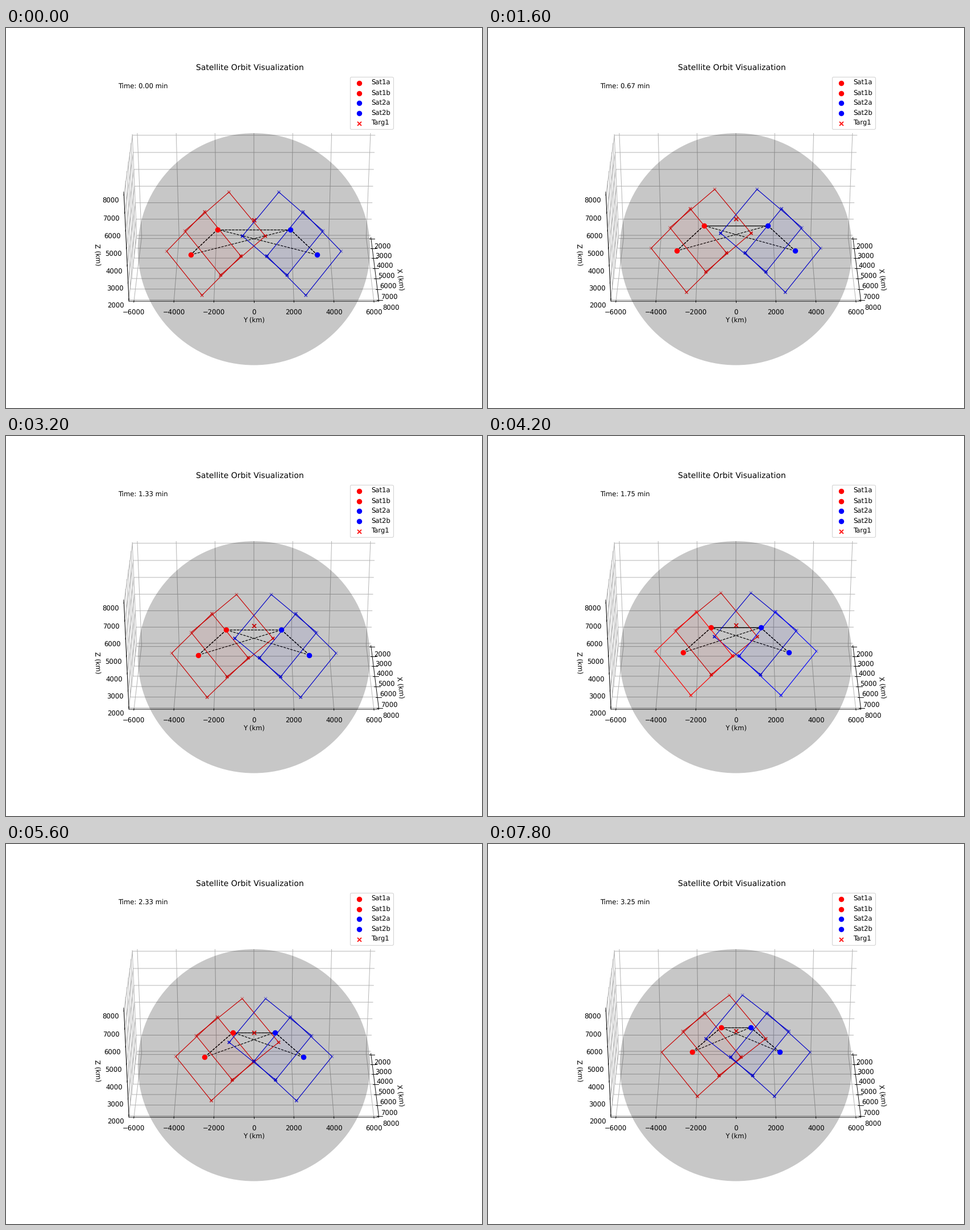
A matplotlib script that plays this animation: 837 px wide and 669 px high, repeating every 8000 ms.

```python
import numpy as np
import matplotlib.pyplot as plt
from matplotlib.animation import FuncAnimation
from matplotlib.patches import Circle, Polygon

W, H, DPI = 837, 669, 83.625
FRAMES, STEP_MS, STEP_S = 40, 200, 5
RED, BLUE = (1, 0, 0), (0, 0, 1)

EARTH, ORBIT, MU = 6371.0, 7371.0, 398600.0       # km, km^3/s^2
RATE = np.sqrt(MU / ORBIT ** 3)                   # rad/s
SPREAD = np.radians(19.84)                        # footprint corner from nadir

# Camera of the 3D box: elevation 30, azimuth 0
ELEV = np.radians(30)
RIGHT = np.array([0, 1, 0])
UP = np.array([-np.sin(ELEV), 0, np.cos(ELEV)])
VIEW = np.array([np.cos(ELEV), 0, np.sin(ELEV)])
BOX_MID = np.array([5000, 0, 5000])
UNIT = 1.829464 * 25 / 24 / np.sqrt(6) / 6250     # box units per km
SIDE = 0.77 * H
FOCAL = SIDE / 0.185
SHIFT = (0.95 / 1.85 - 0.5) * SIDE
CENTER = np.array([0.5125 * W + SHIFT, 0.505 * H - SHIFT])


def project(pts):
    """Points in km (n, 3) to stage pixels (n, 2), y downwards."""
    rel = (np.atleast_2d(pts) - BOX_MID) * UNIT
    scale = FOCAL / (10 - rel @ VIEW)
    return CENTER + np.column_stack([rel @ RIGHT, -(rel @ UP)]) * scale[:, None]


def orbit_frame(u, raan, inc):
    """Unit vectors outwards, along the track and across it."""
    node = np.array([np.cos(raan), np.sin(raan), 0])
    rise = np.array([-np.sin(raan) * np.cos(inc),
                     np.cos(raan) * np.cos(inc), np.sin(inc)])
    out = np.cos(u) * node + np.sin(u) * rise
    track = np.cos(u) * rise - np.sin(u) * node
    return out, track, np.cross(out, track)


class Satellite:
    def __init__(self, label, color, start, raan, inc):
        self.start, self.raan, self.inc = np.radians([start, raan, inc])
        self.color = color
        self.edge = Polygon(np.zeros((4, 2)), fc="none", ec=color, lw=1)
        stage.add_patch(self.edge)
        self.marks = stage.scatter(np.zeros(4), np.zeros(4), s=20, marker="x",
                                   color=[color])
        self.dot = stage.scatter([0], [0], s=50, color=[color], label=label,
                                 zorder=6)

    def move(self, seconds):
        out, track, side = orbit_frame(self.start + RATE * seconds,
                                       self.raan, self.inc)
        self.pos = project(ORBIT * out)[0]
        self.dot.set_offsets([self.pos])

        turn = np.radians(45 + 90 * np.arange(4))[:, None]
        corners = EARTH * (np.cos(SPREAD) * out + np.sin(SPREAD)
                           * (np.cos(turn) * track + np.sin(turn) * side))
        self.quad = project(corners)
        self.edge.set_xy(self.quad)
        self.marks.set_offsets(self.quad)

        # Far corners fade; a quad facing the viewer lies over the globe
        near = corners @ VIEW
        alpha = 0.3 + 0.7 * (near - near.min()) / np.ptp(near)
        self.marks.set_color([(*self.color, a) for a in alpha])
        front = near.max() > EARTH * np.cos(np.radians(2.7))
        self.edge.set_zorder(4 if front else 2.1)
        self.marks.set_zorder(4.1 if front else 2.2)


plt.rcParams["text.hinting"] = "none"
fig = plt.figure(figsize=(W / DPI, H / DPI), dpi=DPI, facecolor="white")

# Axes box with grid
ax = fig.add_subplot(111, projection="3d")
ax.set_box_aspect((1, 2, 1))
ax.view_init(elev=30, azim=1e-4)
ax.set(xlim=(1875, 8125), ylim=(-6250, 6250), zlim=(1875, 8125),
       xlabel="X (km)", ylabel="Y (km)", zlabel="Z (km)",
       xticks=range(2000, 8001, 1000), yticks=range(-6000, 6001, 2000),
       zticks=range(2000, 8001, 1000), title="Satellite Orbit Visualization")
for axis in (ax.xaxis, ax.yaxis, ax.zaxis):
    axis.set_pane_color((1, 1, 1, 1))
clock = ax.text2D(0.05, 0.95, "", transform=ax.transAxes)

# Flat layer in stage pixels for everything that moves
stage = fig.add_axes([0, 0, 1, 1])
stage.set(xlim=(0, W), ylim=(H, 0))
stage.axis("off")
stage.add_patch(Circle(project(np.zeros(3))[0], 204.2, fc=(0, 0, 0, 0.22),
                       ec="none", zorder=3))

sats = [Satellite("Sat1a", RED, 45, -45, 60),
        Satellite("Sat1b", RED, 30, -45, 60),
        Satellite("Sat2a", BLUE, 45, 45, 120),
        Satellite("Sat2b", BLUE, 30, 45, 120)]
target = stage.scatter([0], [0], marker="x", color=[RED], label="Targ1",
                       zorder=2.3)
ax.legend(handles=[s.dot for s in sats] + [target], loc="upper right",
          labelspacing=0.53)

# Tinted area seen by both satellites of a pair
pairs = [sats[:2], sats[2:]]
shared = [Polygon(np.zeros((4, 2)), fc=(*p[0].color, 0.06), ec="none", zorder=2)
          for p in pairs]
for patch in shared:
    stage.add_patch(patch)

# Neighbours are linked twice
LINKS = [(0, 1), (0, 1), (2, 3), (2, 3), (0, 2), (2, 0), (1, 2), (3, 0)]
links = [stage.plot([], [], "k--", lw=1, zorder=1)[0] for _ in LINKS]


def update(i):
    seconds = i * STEP_S
    for sat in sats:
        sat.move(seconds)
    for patch, (a, b) in zip(shared, pairs):
        patch.set_xy(b.quad)
        patch.set_clip_path(a.edge)
    for line, (a, b) in zip(links, LINKS):
        line.set_data(*zip(sats[a].pos, sats[b].pos))
    lat = np.radians(44.75 + 0.0123 * seconds)
    target.set_offsets(project([EARTH * np.cos(lat), 0, EARTH * np.sin(lat)]))
    clock.set_text(f"Time: {seconds / 60:.2f} min")
    return []


anim = FuncAnimation(fig, update, frames=FRAMES, interval=STEP_MS,
                     init_func=lambda: update(0), repeat=True, repeat_delay=0,
                     blit=False)
plt.show()
```
